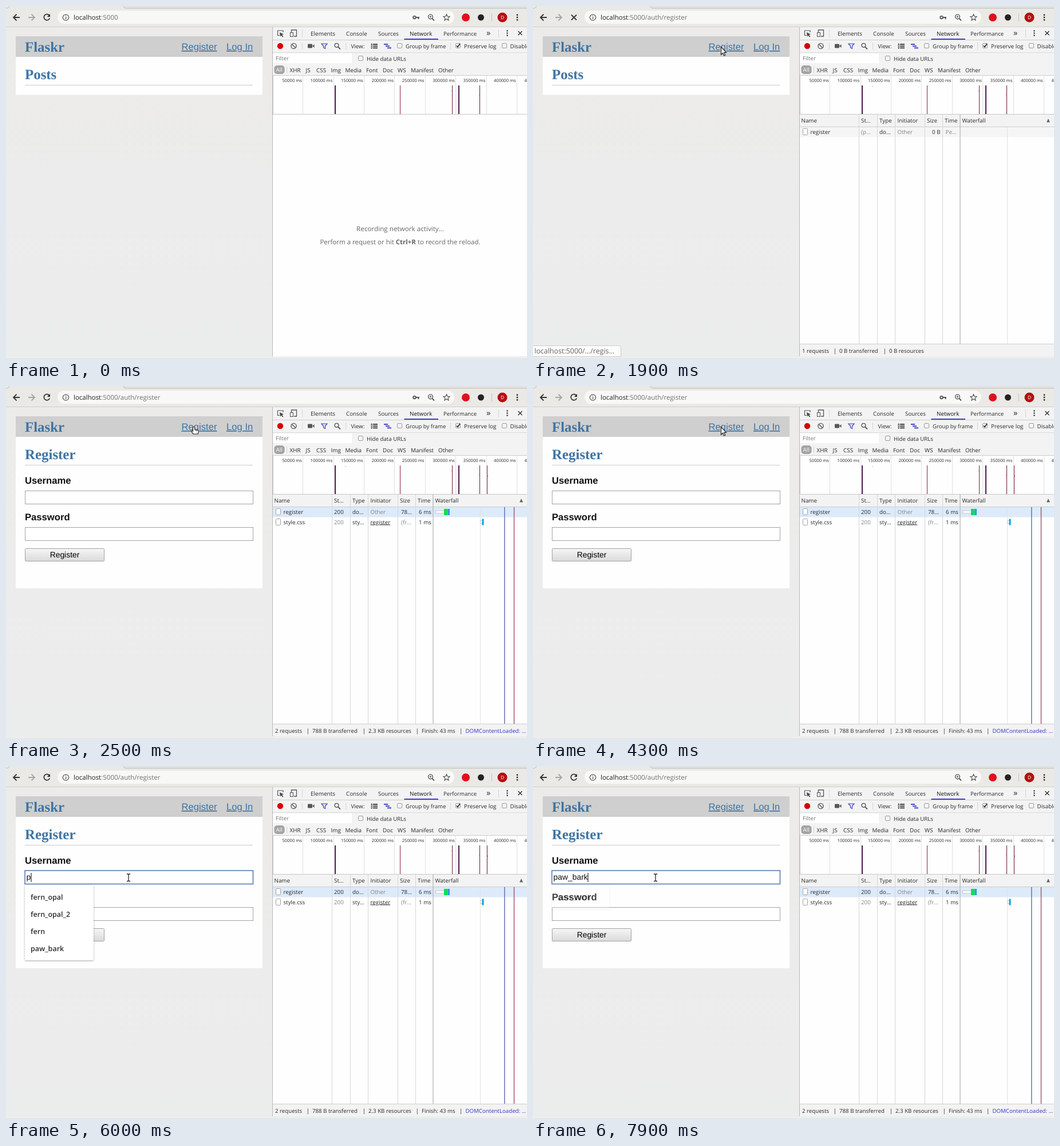
These frames come from a looping animation (910x616 px, 8000 ms). An HTML page:

```html
<!DOCTYPE html>
<html lang="en">
<head>
<meta charset="utf-8">
<title>Register form</title>
<style>
html, body { margin: 0; width: 100%; height: 100%; overflow: hidden; background: #ebebea; }
svg { display: block; width: 100vw; height: 100vh; }
text { font-family: "Open Sans", "Noto Sans", sans-serif; text-rendering: geometricPrecision; white-space: pre; }
.serif { font-family: "Liberation Serif", serif; font-weight: 700; }
.arial { font-family: "Liberation Sans", sans-serif; }
</style>
</head>
<body>
<svg id="stage" viewBox="0 0 910 616" xmlns="http://www.w3.org/2000/svg"></svg>
<script>
const LOOP = 8000, INK = '#2b2b2b', GREY = '#858585', LINK = '#3f74a2', BLUE = '#4646c0';

const rect = (x, y, w, h, fill, more = '') =>
  `<rect x="${x}" y="${y}" width="${w}" height="${h}" fill="${fill}" ${more}/>`;
const box = (x, y, w, h, fill, stroke, more = '') =>
  rect(x + .5, y + .5, w - 1, h - 1, fill, `stroke="${stroke}" ${more}`);
const text = (x, y, s, size = 9.8, fill = INK, more = '') =>
  `<text x="${x}" y="${y}" font-size="${size}" fill="${fill}" ${more}>${s}</text>`;
const path = (d, stroke = INK, width = 1, fill = 'none', more = '') =>
  `<path d="${d}" stroke="${stroke}" stroke-width="${width}" fill="${fill}" ${more}/>`;
const dot = (x, y, r, fill, more = '') => `<circle cx="${x}" cy="${y}" r="${r}" fill="${fill}" ${more}/>`;
const ring = (x, y, r, stroke, width) => dot(x, y, r, 'none', `stroke="${stroke}" stroke-width="${width}"`);
const group = (id, ...parts) => `<g id="${id}">${parts.join('')}</g>`;
const vline = (x, y1, y2, color = '#d4d4d4', width = 1) => rect(x - width / 2, y1, width, y2 - y1, color);
const hline = (y, x1, x2, color = '#cdcdcd') => rect(x1, y, x2 - x1, 1, color);
const dots = (x, y, gap, r) => [-gap, 0, gap].map(d => dot(x, y + d, r, INK)).join('');
const check = (x, y) => box(x, y, 9, 9, '#f6f6f6', '#9a9a9a', 'rx="1.5"');
const serif = (x, y, s) => text(x, y, s, 24.9, LINK, 'class="serif"');
const arial = (x, y, s, size, fill = '#000', more = '') => text(x, y, s, size, fill, 'class="arial" ' + more);

function browserBar() {
  return rect(0, 0, 910, 37, '#eae9e6') +
    path('M205 -1Q205 4 210 4H911V-1Z', '#bebcba', 1, '#e4e2df') +
    path('M0 4Q6 4 6 -1', '#bebcba') + hline(36, 0, 910, '#d0cfcd') +
    rect(90, 8, 693, 23, '#f8f8f7', 'rx="11.5"') +
    path('M24 20H13.5M18.5 14.5L13 20L18.5 25.5', '#333', 1.8) +
    path('M39 20H49.5M44.5 14.5L50 20L44.5 25.5', '#a5a5a5', 1.8) +
    group('reload', path('M75.5 16.3A5.2 5.2 0 1 0 76.3 21.5', '#333', 1.7), path('M77 13.8V19H71.8Z', 'none', 0, '#333')) +
    group('stop', path('M67 15.5L76 24.5M76 15.5L67 24.5', '#333', 1.8)) +
    ring(104.5, 20, 5.2, '#555', 1.2) + rect(104, 19, 1.2, 4, '#555') + rect(104, 16.8, 1.2, 1.2, '#555') +
    text(118, 24, 'localhost<tspan fill="#707070">:5000</tspan><tspan id="route" fill="#707070">/auth/register</tspan>', 11.5, '#222') +
    group('key', ring(713.5, 20, 2.3, '#555', 1.8), path('M716 20H722M720.5 20V23', '#555', 1.9)) +
    ring(741.5, 18.8, 3.9, '#555', 1.4) + path('M744.5 22L748 25.5', '#555', 1.8) +
    path('M739.7 18.8H743.3M741.5 17V20.6', '#555', 1) +
    path('M769.5 14.5L771.1 18.2L775 18.5L772 21.1L773 25L769.5 22.9L766 25L767 21.1L764 18.5L767.9 18.2Z', '#555', 1.2) +
    dot(803, 20, 7, '#e0101c') + dot(829.5, 20, 5.5, '#222') + vline(848.5, 13, 27, '#c4c3c2') +
    dot(867, 20, 8.5, '#b80d12') + text(867, 23, 'D', 8.5, '#fff', 'text-anchor="middle"') + dots(893, 20, 4.3, 1.4);
}

function page() {
  const field = y => box(33, y, 399, 24, '#fff', '#a3a3a3');
  return rect(0, 37, 465, 579, 'url(#wall)') +
    rect(17, 53, 431, 36, '#cfcfcf') + serif(33, 80, 'Flaskr') +
    arial(306.5, 77, 'Register', 16.65, LINK, 'text-decoration="underline"') +
    arial(385, 77, 'Log In', 16.65, LINK, 'text-decoration="underline"') +
    group('posts', rect(17, 89, 431, 66.5, '#fefefe'), serif(33, 128, 'Posts')) +
    group('form', rect(17, 89, 431, 265, '#fefefe'), serif(33, 128, 'Register'),
      arial(33, 171, 'Username', 16.65, '#111', 'font-weight="700"'), field(183),
      arial(33, 235, 'Password', 16.65, '#111', 'font-weight="700"'), field(247),
      box(33, 284, 139, 23, 'url(#btn)', '#a2a2a2', 'rx="1"'),
      arial(102.5, 299.5, 'Register', 13.9, '#000', 'text-anchor="middle"'),
      group('focus', box(32.5, 182.5, 399.5, 24.5, '#fff', '#5a7cb4', 'stroke-width="1.6"')),
      arial(35.5, 199, '', 13.9, '#111', 'id="typed"'),
      rect(36, 187, 1, 16, '#000', 'id="caret"')) +
    hline(138, 33, 431, '#cacaca');
}

function devtools() {
  let s = rect(465, 37, 445, 579, '#fefefe') + rect(465, 37, 445, 85, '#f3f3f3');
  // tab row
  s += path('M478 51.5H474.5V43H484V46', '#555', 1.2) + path('M478 46L485 49.5L482 50.5L484.5 53.5L483 54.5L480.8 51.5L479 53.5Z', 'none', 0, '#444') +
    path('M498.5 46V42H507.5V53H503', '#555', 1.3) + box(496, 46, 6, 8, '#f3f3f3', '#555');
  [[532, 'Elements', 10], [594, 'Console'], [650, 'Sources'], [705, 'Network', 9.9, '#111'], [764, 'Performance', 9.6], [839, '»', 15]]
    .forEach(([x, name, size, fill]) => s += text(x, 51.5, name, size, fill));
  s += rect(695.5, 57, 59.5, 2, BLUE) + [517.5, 860.5].map(x => vline(x, 41, 55)).join('') +
    dots(875.5, 47.5, 4, 1.2) + path('M894.5 44L901.5 51M901.5 44L894.5 51', INK, 1.3) + hline(59, 465, 910);
  // control row
  s += dot(479, 70, 5.2, '#d60000') + ring(502.5, 70, 4.6, '#555', 1.4) + path('M499.3 66.8L505.7 73.2', '#555', 1.4) +
    rect(527, 66.5, 8, 7, '#555', 'rx="1"') + path('M535 70L538.5 67V73Z', 'none', 0, '#555') +
    path('M551 66H561L557.5 70V74.5L554.5 73V70Z', BLUE, 1.2, '#e4e4f8') +
    ring(577.5, 68.8, 3.4, '#555', 1.4) + path('M580 71.5L584 75.5', '#555', 1.8);
  for (let i = 0; i < 3; i++) {
    const y = 66 + i * 3.2;
    s += rect(637.5, y, 2.5, 2, '#444') + rect(641, y, 8, 2, '#444') + rect(660 + i * 3, y, 7, 2, BLUE);
  }
  s += [517.5, 593.5, 776.5].map(x => vline(x, 64, 76)).join('') + text(602.5, 73.5, 'View:') +
    check(683, 65) + text(698, 73.5, 'Group by frame', 9.6) +
    check(785, 65) + path('M787 69.5L789 71.8L793 66', '#222', 1.6) + text(800, 73.5, 'Preserve log', 9.9) +
    check(866, 65) + text(880.5, 73.5, 'Disable cache') + hline(81, 465, 910, '#dadada');
  // filter rows
  s += rect(466, 83, 138, 17, '#fff') + text(471, 95, 'Filter', 9.8, '#777') + check(615, 87) + text(630, 95.5, 'Hide data URLs', 9.7) +
    rect(468.5, 104, 18, 15, '#a3a3a3', 'rx="5"') + text(471.5, 115, 'All', 9.8, '#fff') + vline(490.5, 106, 118);
  [[495.5, 'XHR'], [523.5, 'JS'], [542, 'CSS'], [567.5, 'Img'], [592.5, 'Media'], [629, 'Font'], [658, 'Doc'], [684, 'WS'], [707, 'Manifest'], [755, 'Other']]
    .forEach(([x, name]) => s += text(x, 115.5, name, 9.9));
  s += hline(121, 465, 910);
  // overview
  for (let i = 1; i < 10; i++) {
    const x = 465.3 + i * 53.4;
    s += vline(Math.floor(x) + .5, 122, 189, '#e0e0e0') + text(x - 1.8, 133, i * 50000 + ' ms', 7.6, INK, 'text-anchor="end"');
  }
  [[575, 2, '#4c1a4e'], [688.5, 1, '#8c2440'], [779.5, 1, '#7a1c36'], [791, 2, '#4c1a4e'], [827.5, 1, '#641a38']]
    .forEach(([x, w, color]) => s += vline(x, 139, 189, color, w));
  s += [[593, 140], [778.5, 148], [826.5, 155]].map(([x, y]) => rect(x - .5, y, 1.2, 1.2, '#999')).join('') +
    group('mark', vline(840.5, 139, 189, 'currentColor'), rect(840.5, 157, 1.5, 1.5, '#666')) +
    hline(189, 465, 910, '#c6c6c6') + vline(466, 122, 189, '#999');
  s += group('empty', text(688.5, 394, 'Recording network activity…', 11.7, '#666', 'text-anchor="middle"'),
    text(688.5, 417, 'Perform a request or hit <tspan font-weight="700">Ctrl+R</tspan> to record the reload.', 11.5, '#666', 'text-anchor="middle"'));
  return s + table() + vline(465.5, 37, 613, '#b9b9b9');
}

function table() {
  const file = y => box(471, y, 9, 12, '#fff', '#a0a0a0', 'rx="1"');
  const cells = (y, list) => list.map(([x, s, fill, more]) => text(x, y, s, 9.8, fill, more)).join('');
  const footer = list => list.map(([x, s, fill], i) =>
    (i ? text(x - 10.5, 607, '|', 10, '#222') : '') + text(x, 607, s, 9.7, fill)).join('');
  return group('table',
    rect(465, 190, 445, 21, '#f3f3f3'), hline(211, 465, 910),
    group('rowBg', rect(465, 212, 445, 17.5, 'currentColor')),
    [569.5, 601.5, 632.5, 684.5, 715.5].map(x => vline(x, 190, 591, '#d6d6d6')).join(''),
    vline(828.5, 212, 591, '#e3e3e3'), vline(746, 190, 591, '#b5b5b5', 1.3),
    cells(203.5, [[468.5, 'Name'], [573, 'St…'], [605, 'Type'], [636.5, 'Initiator'], [688, 'Size'], [719, 'Time'], [749.5, 'Waterfall']]),
    path('M897 203.5H903L900 197Z', 'none', 0, '#666'),
    file(214), text(484.5, 223.5, 'register'), text(605, 223.5, 'do…'), text(636.5, 223.5, 'Other', 9.8, GREY),
    rect(465, 591, 445, 22, '#f3f3f3'), hline(591, 465, 910),
    group('pending',
      cells(223.5, [[573, '(p…', GREY], [711.5, '0 B', INK, 'text-anchor="end"'], [720.5, 'Pe…', GREY]]),
      footer([[470, '1 requests'], [535, '0 B transferred'], [622, '0 B resources']])),
    group('done',
      cells(223.5, [[573, '200'], [690, '78…'], [721, '6 ms']]),
      file(232),
      cells(241.5, [[484.5, 'style.css'], [573, '200', GREY], [605, 'sty…'], [636.5, 'register', INK, 'text-decoration="underline"'], [690, '(fr…', GREY], [721, '1 ms']]),
      box(750, 218, 16, 5, '#fff', '#c9c9c9'), rect(765, 215, 6.5, 11, '#0be04e'), rect(771.5, 215, 3.5, 11, '#2a9be0'),
      box(828, 235, 5, 6, '#fff', '#c9c9c9'), rect(831.5, 232.5, 3, 11, '#0aa0e6'),
      vline(870.8, 212, 591, '#5a6cb4', 1.4),
      footer([[470, '2 requests'], [535, '788 B transferred'], [633, '2.3 KB resources'], [726, 'Finish: 43 ms'], [802.5, 'DOMContentLoaded: …', '#2f35c8']])),
    group('loaded', vline(887.5, 212, 591, '#a05068', 1.4)));
}

function popup(id, w, names) {
  const h = names.length * 30 + 12;
  return group(id, rect(33, 208, w, h, '#fff', 'rx="2" filter="url(#shadow)"'),
    names.map((n, i) => text(43, 233.5 + i * 30, n, 12.5, '#2b2b2b', 'font-weight="600"')).join(''));
}

const BEAM = 'M-3 -6H-1L0 -5L1 -6H3M-3 6.5H-1L0 5.5L1 6.5H3M0 -5V5.5';
const stage = document.getElementById('stage');
stage.innerHTML = `<defs>
  <linearGradient id="btn" x2="0" y2="1"><stop stop-color="#f6f6f6"/><stop offset="1" stop-color="#dadada"/></linearGradient>
  <linearGradient id="wall" x2="0" y2="1"><stop stop-color="#ecebea"/><stop offset="1" stop-color="#ebedec"/></linearGradient>
  <filter id="shadow" x="-10%" y="-10%" width="120%" height="130%"><feDropShadow dx="0" dy="1" stdDeviation="1.5" flood-opacity=".35"/></filter>
  </defs>` + browserBar() + page() + devtools() + rect(0, 613, 910, 3, '#eeeeec') +
  popup('all', 120, ['fern_opal', 'fern_opal_2', 'fern', 'paw_bark']) + popup('match', 100, ['paw_bark']) +
  group('status', path('M-1 594.5H150Q153.5 594.5 153.5 598V613.5H-1Z', '#cbcbca', 1, '#fcfcfb'),
    text(2.5, 608, 'localhost:5000/…/regis…', 12.4, '#666')) +
  group('cursor',
    group('arrow', path('M.5 .5V14L3.5 11.2L5.6 16L7.8 15L5.7 10.4H9.5Z', '#222', 1.2, '#fff')),
    group('hand', path('M0 .5Q1.7 .5 1.7 2V5L7 6Q8.5 6.4 8.2 8L7.3 13H-1L-4 8.5Q-4.3 7 -2.5 7L-1.5 8V2Q-1.5 .5 0 .5Z', '#222', 1.2, '#fff'), path('M3.3 5.5V7.5M5.5 6V8', '#222')),
    group('beam', path(BEAM, '#fff', 2.8), path(BEAM, '#222', 1.3)));

const el = {};
stage.querySelectorAll('[id]').forEach(n => el[n.id] = n);
const show = (id, on) => el[id].style.display = on ? '' : 'none';
const fade = (id, a) => { show(id, a > 0); el[id].style.opacity = a; };

// [ms, x, y]
const trail = [[700, 312, 20], [900, 326, 62], [1000, 326, 62], [1200, 328, 71], [4300, 328, 71],
  [4500, 288, 157], [4600, 288, 157], [4900, 214, 195]];
const word = 'paw_bark', strokes = [6000, 6300, 6400, 6900, 7400, 7500, 7700, 7800];

function pointer(t) {
  const i = trail.findIndex(k => k[0] > t);
  if (i < 0) return trail[trail.length - 1].slice(1);
  if (!i) return trail[0].slice(1);
  const [a, b] = [trail[i - 1], trail[i]], p = (t - a[0]) / (b[0] - a[0]);
  return [a[1] + (b[1] - a[1]) * p, a[2] + (b[2] - a[2]) * p];
}

// value of the last [ms, value] pair reached
const step = (t, first, ...pairs) => pairs.reduce((v, [at, next]) => t >= at ? next : v, first);

function draw(ms) {
  const t = Math.floor(ms / 100) * 100;
  const busy = t >= 1700 && t < 2000, done = t >= 2000;
  show('stop', busy);
  show('reload', !busy);
  show('route', t >= 1700);
  show('key', t < 6000);
  show('posts', !done);
  show('form', done);
  show('empty', t < 1800);
  show('table', t >= 1800);
  show('pending', !done);
  show('done', done);
  show('mark', done);
  show('loaded', t >= 2100);
  el.mark.style.color = t < 2100 ? '#4f62ae' : '#8c2440';
  el.rowBg.style.color = done ? '#dceafa' : '#f5f5f5';
  fade('status', step(t, 0, [1200, .4], [1300, .8], [1400, 1], [2300, .2], [2500, 0]));

  show('cursor', t >= 700);
  el.cursor.setAttribute('transform', `translate(${pointer(t)})`);
  const shape = step(t, 'arrow', [1200, 'hand'], [1900, 'arrow'], [2000, 'hand'], [4300, 'arrow'], [4900, 'beam']);
  ['arrow', 'hand', 'beam'].forEach(id => show(id, id === shape));

  const typed = word.slice(0, strokes.filter(at => t >= at).length);
  if (el.typed.textContent !== typed) el.typed.textContent = typed;
  show('focus', t >= 4900);
  show('caret', t >= 4900 && !(t >= 5600 && t < 6000));
  el.caret.setAttribute('x', 36 + (typed ? Math.round(el.typed.getComputedTextLength()) - .5 : 0));
  show('all', t >= 5000 && t < 6300);
  fade('match', step(t, 0, [6300, 1], [7800, .6], [7900, .2]));
}

function tick() {
  draw(performance.now() % LOOP);
  requestAnimationFrame(tick);
}
tick();
</script>
</body>
</html>
```
